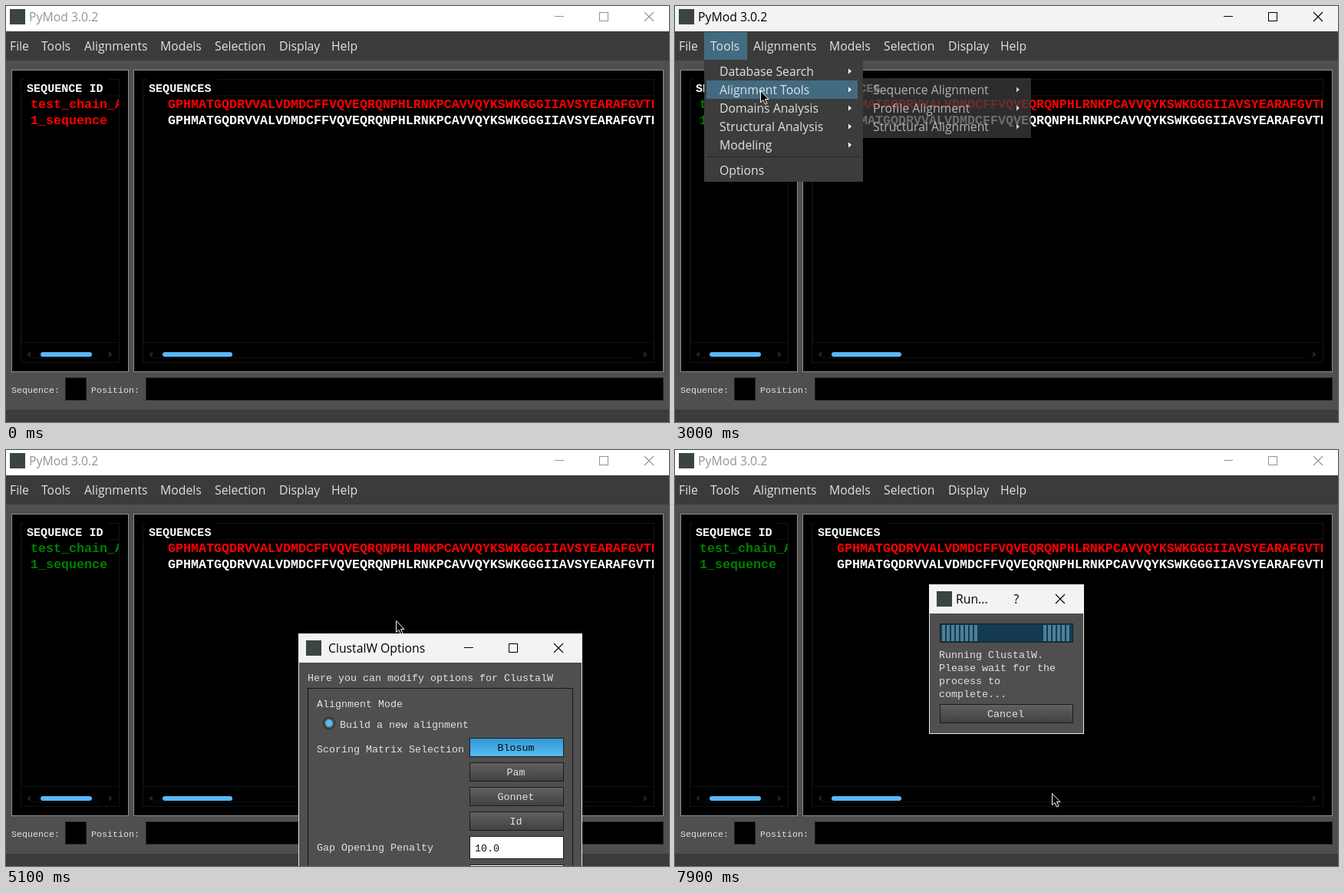
Recreate the animation shown at these times as an HTML page with a canvas. Size 864 by 542 pixels, loop 8000 ms.

```html
<!DOCTYPE html>
<html lang="en">
<head>
<meta charset="utf-8">
<title>PyMod</title>
<style>
html, body { margin: 0; height: 100%; overflow: hidden; background: #4f4f4f; }
canvas { display: block; width: 100vw; height: 100vh; }
</style>
</head>
<body>
<canvas id="stage" width="864" height="542"></canvas>
<script>
const ctx = document.getElementById('stage').getContext('2d');
const LOOP = 8000, STEP = 100;
const UI = '15.75px "Open Sans", sans-serif';
const mono = (advance, weight = '') => `${weight} ${advance / 0.6}px "Liberation Mono", monospace`;
const MONO = mono(8);
const SEQUENCE = 'GPHMATGQDRVVALVDMDCFFVQVEQRQNPHLRNKPCAVVQYKSWKGGGIIAVSYEARAFGVTR';
const LIGHT = '#e2e2e2', PANEL = '#4f4f4f', MENU = '#3c3c3c', HIGHLIGHT = '#426b81';

// Pointer tip: time, x, y
const pointerPath = [
  [100, 794, 52], [500, 330, 108], [900, 74, 122], [1100, 76, 130], [1200, 76, 140],
  [1600, 76, 142], [2000, 66, 50], [2300, 66, 58], [2800, 111, 110], [3200, 111, 110],
  [3600, 310, 109], [3900, 386, 109], [4100, 398, 109], [4200, 422, 109], [4400, 482, 109],
  [4700, 490, 110], [5100, 508, 222], [5400, 503, 254], [5800, 443, 119], [6000, 443, 119],
  [6400, 653, 260], [6900, 512, 444], [7100, 507, 462], [7400, 507, 462], [7800, 491, 455], [7900, 491, 447]
];

function pointerAt(t) {
  const i = pointerPath.findIndex(p => p[0] >= t);
  const b = pointerPath[i], a = pointerPath[Math.max(0, i - 1)];
  const u = (t - a[0]) / (b[0] - a[0] || 1), k = u * u * (3 - 2 * u);
  return [a[1] + (b[1] - a[1]) * k, a[2] + (b[2] - a[2]) * k];
}

const ramp = (t, start, length) => Math.min(1, Math.max(0, (t - start) / length));

function rect(x, y, w, h, fill, stroke) {
  ctx.fillStyle = fill;
  ctx.fillRect(x, y, w, h);
  if (stroke) outline(x, y, w, h, stroke);
}

function outline(x, y, w, h, color) {
  ctx.strokeStyle = color;
  ctx.lineWidth = 1;
  ctx.strokeRect(x + 0.5, y + 0.5, w - 1, h - 1);
}

function text(str, x, y, font = UI, color = LIGHT, align = 'left') {
  ctx.font = font;
  ctx.fillStyle = color;
  ctx.textAlign = align;
  ctx.fillText(str, x, y);
}

function shape(points, fill, stroke) {
  ctx.beginPath();
  points.forEach(([x, y]) => ctx.lineTo(x, y));
  ctx.closePath();
  ctx.fillStyle = fill;
  ctx.fill();
  if (stroke) {
    ctx.strokeStyle = stroke;
    ctx.lineWidth = 1;
    ctx.stroke();
  }
}

function disc(x, y, r, fill) {
  ctx.beginPath();
  ctx.arc(x, y, r, 0, 7);
  ctx.fillStyle = fill;
  ctx.fill();
}

const arrow = (x, y, w, h, color) => shape([[x, y - h], [x + w, y], [x, y + h]], color);

function gradient(y, h, top, bottom) {
  const g = ctx.createLinearGradient(0, y, 0, y + h);
  g.addColorStop(0, top);
  g.addColorStop(1, bottom);
  return g;
}

function at(x, y, alpha, draw) {
  if (alpha <= 0) return;
  ctx.save();
  ctx.globalAlpha = alpha;
  ctx.translate(x, y);
  draw();
  ctx.restore();
}

const icon = (x, y) => rect(x, y, 20, 20, '#3a4542');

function crossMark(x, y, color) {
  ctx.strokeStyle = color;
  ctx.lineWidth = 1.1;
  ctx.beginPath();
  ctx.moveTo(x, y - 6); ctx.lineTo(x + 12, y + 6);
  ctx.moveTo(x + 12, y - 6); ctx.lineTo(x, y + 6);
  ctx.stroke();
}

function windowButtons(x, y, color) {
  rect(x, y - 1, 12, 1, color);
  outline(x + 58, y - 6, 12, 12, color);
  crossMark(x + 117, y, color);
}

function button(label, x, y, w, active) {
  const fill = active ? gradient(y, 25, '#2f95d0', '#5bbdf9') : gradient(y, 25, '#626262', '#404040');
  rect(x, y, w, 25, fill, '#1b1b1b');
  text(label, x + w / 2 - 1, y + 17, MONO, active ? '#0a0a0a' : LIGHT, 'center');
}

function scrollPanel(x, w, title, titleEnd, thumbWidth) {
  rect(x, 83, w, 394, '#000', '#8e8e8e');
  const left = x + 12, width = w - 24;
  outline(left, 95, width, 370, '#131313');
  outline(left + 1, 116, width - 1, 323, '#101010');
  rect(left + 5, 95, titleEnd - left, 22, '#000');
  rect(left + 14, 458, width - 40, 1, '#0f0f0f');
  arrow(left + 13, 454, -5, 4, '#222');
  arrow(left + width - 14, 454, 5, 4, '#222');
  ctx.fillStyle = '#5ab7fa';
  ctx.beginPath();
  ctx.roundRect(x + 38, 451, thumbWidth, 6, 3);
  ctx.fill();
  text(title, x + 20, 112, mono(9.05, 'bold'), '#fff');
}

function clipped(str, x, y, color, right) {
  ctx.save();
  ctx.beginPath();
  ctx.rect(0, 84, right, 380);
  ctx.clip();
  text(str, x, y, mono(10, 'bold'), color);
  ctx.restore();
}

function mainWindow(t) {
  const active = t >= 1000 && t < 4700;
  const ink = active ? '#000' : '#949494';
  rect(0, 0, 864, 542, PANEL);
  rect(0, 0, 864, 33, active ? '#f3f3f3' : '#fff');
  icon(5, 4);
  text('PyMod 3.0.2', 30, 20, UI, ink);
  windowButtons(715, 14, ink);

  rect(0, 33, 864, 38, '#3b3b3b');
  if (t >= 2000 && t < 4700) rect(38, 34, 56, 36, HIGHLIGHT);
  [['File', 5], ['Tools', 46], ['Alignments', 102], ['Models', 201], ['Selection', 272],
   ['Display', 356], ['Help', 424]].forEach(([label, x]) => text(label, x, 58));

  scrollPanel(7, 153, 'SEQUENCE ID', 128, 67);
  scrollPanel(166, 691, 'SEQUENCES', 270, 91);
  clipped('test_chain_A', 32, 133, t >= 1000 ? '#008000' : '#f00', 147);
  clipped('1_sequence', 32, 154, t >= 1600 ? '#008000' : '#f00', 147);
  clipped(SEQUENCE, 211, 133, '#f00', 844);
  clipped(SEQUENCE, 211, 154, '#fff', 844);

  text('Sequence:', 7, 504, mono(7));
  text('Position:', 111, 504, mono(7));
  rect(77, 484, 28, 30, '#000', '#222');
  rect(182, 484, 675, 30, '#000', '#222');
  const hovered = t >= 900 && t < 1200 ? '_A' : t >= 1200 && t < 1800 ? 'ce' : '';
  text(hovered, 81, 504, mono(8, 'bold'), '#fff');
  rect(0, 526, 864, 16, '#3b3b3b');
}

function menu(x, y, w, h, items, selected, hasArrows, alpha) {
  at(x, y, alpha, () => {
    rect(0, 0, w, h, MENU);
    items.forEach((label, i) => {
      const top = 3 + i * 24;
      if (i === selected) rect(3, top, w - 10, 24, HIGHLIGHT);
      text(label, 20, top + 18);
      if (hasArrows) arrow(w - 19, top + 12, 4, 3.5, '#fff');
    });
  });
}

function menus(t) {
  if (t < 2200 || t >= 4700) return;
  const [px, py] = pointerAt(t);
  const alpha = ramp(t, 2100, 200);
  const row = py >= 73 ? Math.floor((py - 73) / 24) : -1;
  menu(38, 70, 207, 159, ['Database Search', 'Alignment Tools', 'Domains Analysis',
    'Structural Analysis', 'Modeling'], row, true, alpha);
  at(38, 70, alpha, () => {
    rect(4, 126, 198, 1, '#262626');
    text('Options', 20, 150);
  });
  menu(238, 94, 226, 78, ['Sequence Alignment', 'Profile Alignment', 'Structural Alignment'],
    px > 241 ? 0 : -1, true, ramp(t, 2850, 200));
  menu(457, 94, 283, 102, ['ClustalW', 'Clustal Omega', 'MUSCLE', 'SALIGN (Sequence Alignment)'],
    px > 460 ? 0 : -1, false, ramp(t, 3500, 200));
}

function dialogFrame(w, h, title, titleX) {
  rect(0, 0, w, h, PANEL, '#e8e8e8');
  rect(0, 0, w, 38, '#f3f3f3');
  icon(10, 9);
  text(title, titleX, 25, UI, '#000');
}

function optionsDialog(t) {
  if (t < 4800 || t >= 7300) return;
  const [px, py] = pointerAt(Math.min(5800, Math.max(5400, t)));
  at(Math.round(px - 122), Math.round(py - 15), ramp(t, 4700, 200), () => {
    dialogFrame(370, 387, 'ClustalW Options', 39);
    windowButtons(216, 19, '#000');
    text('Here you can modify options for ClustalW', 12, 62, MONO);
    outline(12, 71, 346, 272, '#151515');
    text('Alignment Mode', 24, 96, MONO);
    disc(40, 117, 8, '#242424');
    disc(40, 117, 7, '#555');
    disc(40, 117, 4.7, '#5ab7fa');
    text('Build a new alignment', 54, 123, MONO);
    text('Scoring Matrix Selection', 24, 155, MONO);
    ['Blosum', 'Pam', 'Gonnet', 'Id'].forEach((name, i) => button(name, 223, 136 + 32 * i, 123, i === 0));
    [['Gap Opening Penalty', '10.0'], ['Gap Extension Penalty', '0.2']].forEach(([label, value], i) => {
      const y = 264 + 37 * i;
      text(label, 24, y + 19, MONO);
      rect(223, y, 123, 30, '#fff', '#1b1b1b');
      text(value, 230, y + 20, MONO, '#111');
    });
    button('Submit', 138, 350, 93, t >= 7200);
  });
}

function progressDialog(t) {
  if (t < 7400) return;
  at(331, 175, ramp(t, 7300, 200), () => {
    dialogFrame(202, 195, 'Run...', 35);
    text('?', 114, 25, UI, '#000', 'center');
    crossMark(165, 19, '#000');
    rect(14, 51, 174, 25, '#143b51', '#10202a');
    const first = 22 + Math.floor((t - 7900) / 25) + 56;
    for (let i = 0; i < 14; i++) rect(17 + (first + i) % 28 * 6, 53, 4, 21, '#4f7f99');
    ['Running ClustalW.', 'Please wait for the', 'process to', 'complete...']
      .forEach((line, i) => text(line, 13, 96 + 17 * i, MONO));
    button('Cancel', 14, 156, 174, false);
  });
}

function pointer(t) {
  if (t < 100) return;
  const [x, y] = pointerAt(t).map(Math.round);
  at(x + 0.5, y + 0.5, 1, () => shape(
    [[0, 0], [0, 15], [3.5, 12], [6, 17.5], [8.5, 16.5], [6, 11], [10.5, 11]], '#000', '#fff'));
}

function draw(now) {
  const t = Math.floor(now % LOOP / STEP) * STEP;
  mainWindow(t);
  menus(t);
  optionsDialog(t);
  progressDialog(t);
  pointer(t);
  requestAnimationFrame(draw);
}
requestAnimationFrame(draw);
</script>
</body>
</html>
```
